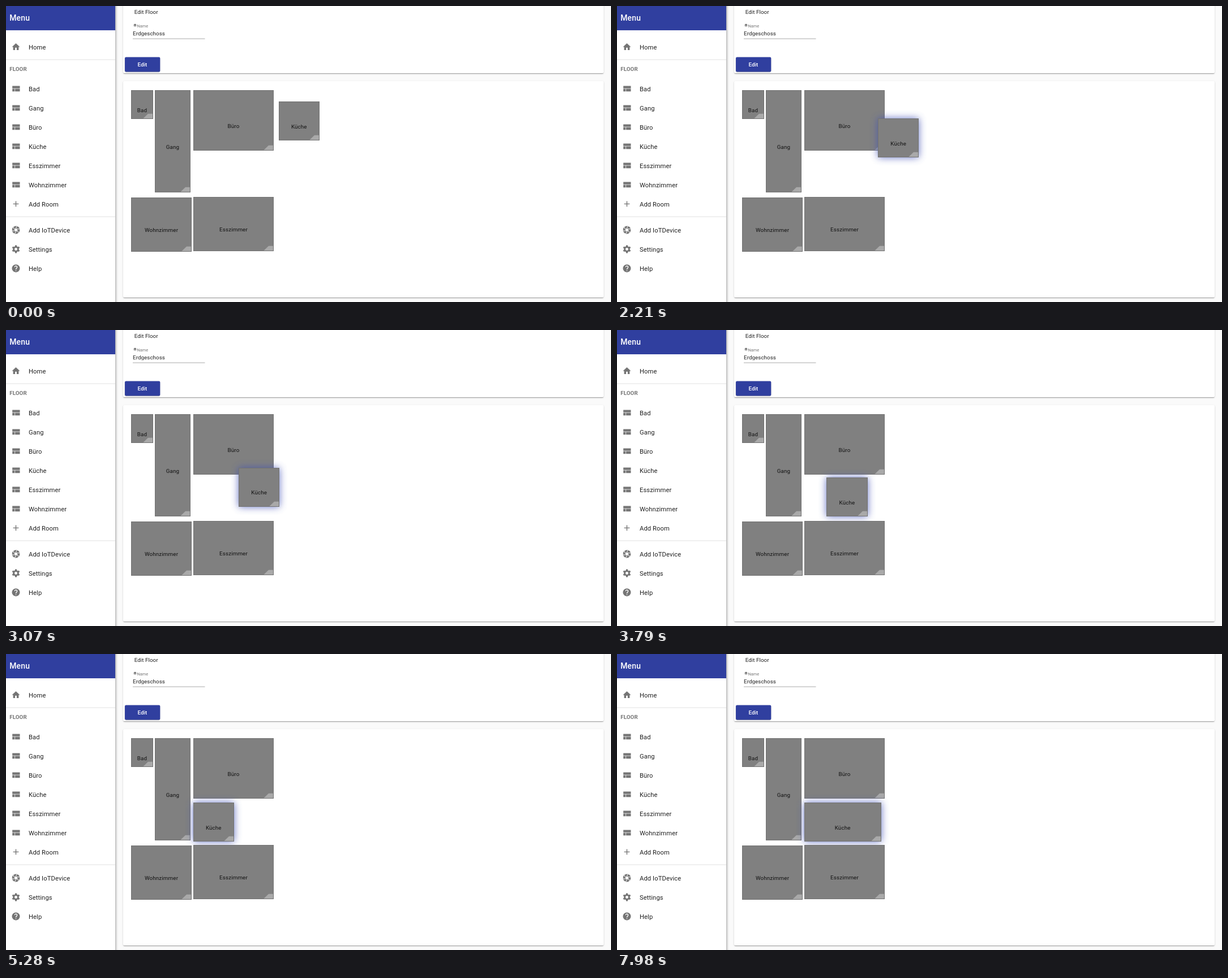
An HTML page for the animation above (8000 ms loop, 1069x524 px).

```html
<!DOCTYPE html>
<html lang="en">
<head>
<meta charset="utf-8">
<title>Floor editor</title>
<style>
html, body { margin: 0; width: 100%; height: 100%; overflow: hidden; background: #fafafa; }
#stage { position: relative; width: 1069px; height: 524px; overflow: hidden; background: #fafafa; }
#stage > * { position: absolute; }
.raised { border-radius: 2px; box-shadow: 0 2px 1px -1px rgba(0,0,0,.2), 0 1px 1.5px rgba(0,0,0,.14), 0 1px 3.5px rgba(0,0,0,.12); }
.card { left: 207px; width: 849px; background: #fff; }
#form { top: -20px; height: 139px; }
#plan { top: 133px; height: 383px; }
#edit { left: 210px; top: 91px; width: 62px; height: 25px; }
#side { left: 0; top: -10px; width: 193px; height: 544px; background: #fff; box-shadow: 1px 0 4px rgba(0,0,0,.4); }
svg { left: 0; top: 0; }
text { font-family: Roboto, sans-serif; font-size: 9.8px; fill: rgba(0,0,0,.87); }
.nav { font-size: 11.2px; letter-spacing: .1px; }
.room { text-anchor: middle; letter-spacing: .13px; }
.icon { fill: #757575; }
</style>
</head>
<body>
<div id="stage">
  <div id="form" class="card raised"></div>
  <div id="plan" class="card raised"></div>
  <div id="edit" class="raised"></div>
  <div id="side"></div>
  <svg id="art" width="1069" height="524" viewBox="0 0 1069 524">
    <defs>
      <filter id="blur" filterUnits="userSpaceOnUse" x="200" y="120" width="460" height="300">
        <feGaussianBlur stdDeviation="7"/>
      </filter>
      <clipPath id="field"><rect x="220" y="40" width="135" height="13.6"/></clipPath>
    </defs>
    <rect width="193" height="43" fill="#303f9f"/>
    <rect x="210" y="90.6" width="62.3" height="25.8" rx="2" fill="#303f9f"/>
    <text x="6.2" y="26" style="font-size:14px;font-weight:500;letter-spacing:.15px;fill:#fff">Menu</text>
    <text x="6.2" y="115" style="font-weight:700;letter-spacing:.1px;fill:#757575">FLOOR</text>
    <path d="M0 95H193M0 373H193" stroke="#e0e0e0"/>
    <text x="226.7" y="14" letter-spacing=".06">Edit Floor</text>
    <text x="231.5" y="38" style="font-size:7.35px;fill:#757575">Name</text>
    <text x="224" y="52" letter-spacing=".06" clip-path="url(#field)">Erdgeschoss</text>
    <path d="M224 58H351.5" stroke="#949494" stroke-width=".8"/>
    <text x="241" y="107" text-anchor="middle" style="font-weight:500;fill:#fff">Edit</text>
  </svg>
</div>
<script>
const art = document.getElementById('art');

function set(el, attrs) {
  for (const k in attrs) el.setAttribute(k, attrs[k]);
}

function add(parent, tag, attrs = {}, text = '') {
  const el = document.createElementNS('http://www.w3.org/2000/svg', tag);
  set(el, attrs);
  el.textContent = text;
  return parent.appendChild(el);
}

// Icons live on a 24 unit grid
const path = d => g => add(g, 'path', { d });
const spun = d => g => {
  for (let a = 0; a < 360; a += 60) add(g, 'path', { d, transform: `rotate(${a} 12 12)` });
};
const tooth = spun('M9.2 6.2L10 2H14L14.8 6.2z');

const icons = {
  home: path('M10 20v-6h4v6h5v-8h3L12 3 2 12h3v8z'),
  room: path('M3 19h6v-7H3zM10 19h12v-7H10zM3 5v6h19V5z'),
  plus: path('M19 13h-6v6h-2v-6H5v-2h6V5h2v6h6z'),
  layers: path('M12 18.5L4.6 12.8 3 14l9 7 9-7-1.6-1.2zM12 16l9-7-9-7-9 7z'),
  shutter: spun('M11.88 9L15.54 2.66A10 10 0 0 1 21.54 9z'),
  gear(g) {
    add(g, 'circle', { cx: 12, cy: 12, r: 5.5, fill: 'none', stroke: '#757575', 'stroke-width': 3.9 });
    tooth(g);
  },
  help(g) {
    add(g, 'circle', { cx: 12, cy: 12, r: 10 });
    add(g, 'path', { d: 'M9 9a3 3 0 1 1 5.1 2.1Q12 13 12 15M12 17v2', fill: 'none', stroke: '#fff', 'stroke-width': 2 });
  }
};

function drawIcon(name, cx, cy, scale) {
  icons[name](add(art, 'g', { class: 'icon', transform: `translate(${cx} ${cy}) scale(${scale}) translate(-12 -12)` }));
}

function menu(top, items) {
  items.forEach(([icon, label], i) => {
    const y = top + 34 * i;
    drawIcon(icon, 17.5, y - 4.6, .7);
    add(art, 'text', { class: 'nav', x: 40, y }, label);
  });
}

const names = ['Bad', 'Gang', 'Büro', 'Küche', 'Esszimmer', 'Wohnzimmer'];
menu(77, [['home', 'Home']]);
menu(151, [...names.map(n => ['room', n]), ['plus', 'Add Room']]);
menu(401, [['shutter', 'Add IoTDevice'], ['gear', 'Settings'], ['help', 'Help']]);
drawIcon('layers', 228, 34.3, .306);

function makeRoom(name) {
  const g = add(art, 'g');
  return {
    glow: add(g, 'rect', { fill: '#3f51b5', filter: 'url(#blur)' }),
    box: add(g, 'rect', { fill: '#808080', stroke: '#727272' }),
    grip: add(g, 'path', { fill: '#a9a9a9' }),
    label: add(g, 'text', { class: 'room' }, name)
  };
}

function placeRoom(room, x, y, w, h, glow = 0) {
  const l = Math.round(x), t = Math.round(y), r = Math.round(x + w), b = Math.round(y + h);
  set(room.glow, { x: l, y: t, width: r - l, height: b - t, opacity: .8 * glow });
  set(room.box, { x: l + .5, y: t + .5, width: r - l - 1, height: b - t - 1 });
  set(room.grip, { d: `M${r - 17.5} ${b - 1}l8.5 -8.2h8v8.2z` });
  set(room.label, { x: x + w / 2, y: Math.round(y + h / 2 + 13.2) });
}

const [bath, hall, office, kitchen, dining, living] = names.map(makeRoom);
placeRoom(bath, 221, 149, 39, 51);
placeRoom(hall, 263, 149, 63, 181);
placeRoom(office, 331, 149, 142, 107);
placeRoom(dining, 331, 338, 142, 96);
placeRoom(living, 221, 339, 107, 96);

// The pointer moves in bursts; inside a burst the picture updates on a beat
const bursts = [[490, 560], [1660, 2410], [2510, 3270], [3370, 4090], [4190, 4730], [4880, 5280],
  [5620, 5620], [6520, 6520], [6670, 7090], [7250, 7430], [7670, 7830], [7980, 7980]];
const beat = 50;

function lastUpdate(t) {
  const burst = bursts.filter(b => b[0] <= t).pop();
  if (!burst) return 0;
  const [from, to] = burst;
  return t >= to ? to : Math.max(from, to - Math.ceil((to - t) / beat) * beat);
}

// Key points: time, then values
const drag = [[1610, 481.6, 169], [2210, 461, 199.4], [3070, 411, 243.5], [3270, 396, 256],
  [3790, 370.2, 260.8], [4090, 366, 262.5], [4530, 351.6, 263], [5280, 330.6, 263]];
const stretch = [[5280, 72.4], [6600, 73], [7090, 114.4], [7980, 136]];

const clamp = v => Math.min(1, Math.max(0, v));

function at(keys, t) {
  let i = 1;
  while (i < keys.length - 1 && t > keys[i][0]) i++;
  const [t0, ...a] = keys[i - 1], [t1, ...b] = keys[i];
  const k = clamp((t - t0) / (t1 - t0));
  return a.map((v, j) => v + (b[j] - v) * k);
}

function draw(ms) {
  const t = lastUpdate(ms);
  const [x, y] = at(drag, t), [w] = at(stretch, t);
  placeRoom(kitchen, x, y, w, 69, clamp((t - 420) / 140));
}

let start;
function loop(now) {
  start ??= now;
  draw((now - start) % 8000);
  requestAnimationFrame(loop);
}
draw(0);
requestAnimationFrame(loop);
</script>
</body>
</html>
```
